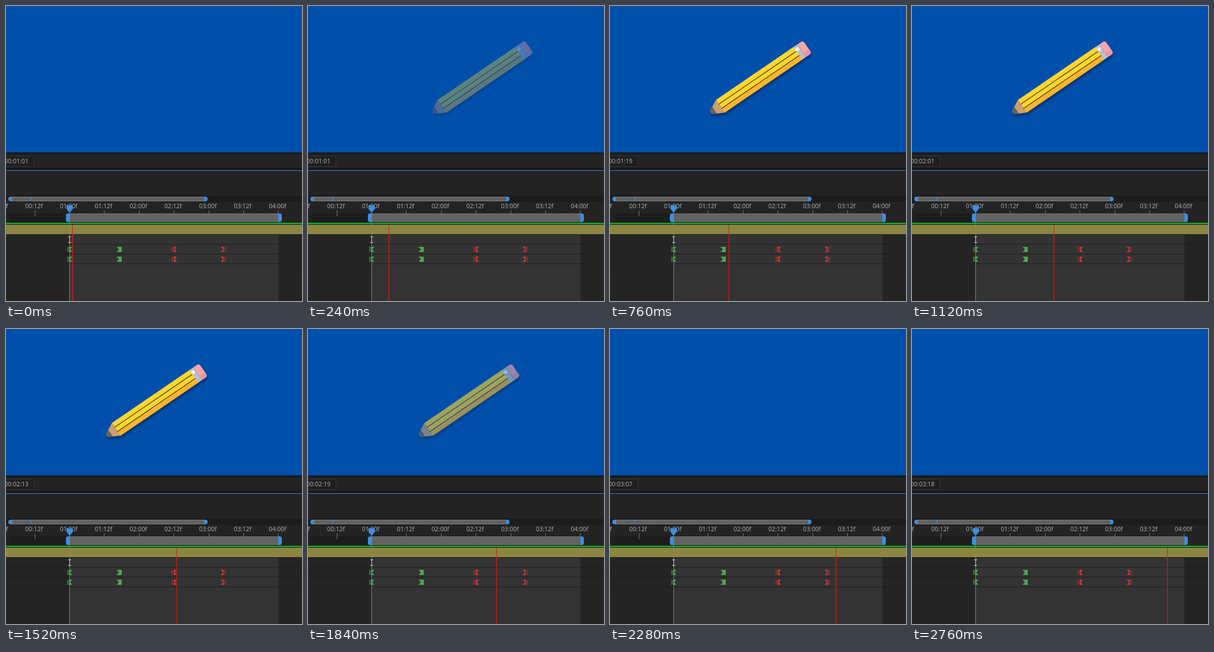
These frames come from a looping animation (514 px wide and 512 px high, 2800 ms). An HTML page:

```html
<!DOCTYPE html>
<html lang="en">
<head>
<meta charset="utf-8">
<title>Pencil timeline</title>
<style>
  html, body { margin: 0; width: 100%; height: 100%; overflow: hidden; background: #232323; }
  svg { display: block; width: 514px; height: 512px; }
  text { font: 10.5px "Noto Sans", "Open Sans", sans-serif; fill: #a9a9a9; }
  #pencil { filter: drop-shadow(1px 4px 2px rgba(0, 10, 40, .42)); }
</style>
</head>
<body>
<svg viewBox="0 0 514 512">
  <defs>
    <g id="keyOut">
      <path d="M-4.5-4.5H4.5L1 0 4.5 4.5H-4.5Z" fill="currentColor"/>
      <path d="M-4.5-4.5H0V4.5H-4.5Z" fill="#1c1c1c" opacity=".5"/>
    </g>
    <path id="keyIn" d="M-4.5-4.5H4.5V4.5H-4.5L-.5 0Z" fill="currentColor"/>
    <path id="half" d="M0-4.5H4.5V4.5H0Z" fill="#1c1c1c" opacity=".5"/>
  </defs>

  <rect width="514" height="512" fill="#232323"/>
  <rect width="514" height="254" fill="#0050ab"/>

  <g id="pencil">
    <g transform="translate(191.5 174) rotate(-34.3)">
      <path d="M0-13.3L-18-4Q-22 0-18 4L0 13.3Z" fill="#c99f6c"/>
      <path d="M-12-7.1L-18-4Q-22 0-18 4L-12 7.1Z" fill="#6b6059"/>
      <path d="M0-13.3H164V13.3H0Z" fill="#ffd530"/>
      <path d="M0 4.4H164V13.3H0Z" fill="#f9b52d"/>
      <path d="M-1-4.4H164M-1 4.4H164" stroke="#37332c" stroke-width="1.1"/>
      <path d="M163-13.3H171V13.3H163Z" fill="#b9bfd0"/>
      <path d="M163-9.5H169V-3.5H163Z" fill="#f4f6fb"/>
      <path d="M171-13.3H178Q183-13.3 183-8V8Q183 13.3 178 13.3H171Z" fill="#f9a5aa"/>
      <path d="M171 5H183V8Q183 13.3 178 13.3H171Z" fill="#e9969f"/>
    </g>
  </g>

  <!-- header -->
  <rect y="254" width="514" height="4" fill="#1b1b1b"/>
  <rect x="-2" y="260.5" width="50.5" height="18" fill="#1f1f1f" stroke="#343434"/>
  <rect y="281" width="514" height="4" fill="#191919"/>
  <rect y="285" width="514" height="1" fill="#3f7fd6"/>
  <text id="code" x="39" y="273" text-anchor="end"></text>

  <!-- navigator and ruler -->
  <rect y="329" width="514" height="11" fill="#1c1c1c"/>
  <rect x="10.5" y="331.5" width="334" height="7" fill="#606060" stroke="#7c7c7c"/>
  <path d="M10 331H8Q4 331 4 335T8 339H10ZM344 331H346Q350 331 350 335T346 339H344Z" fill="#3d8ee0"/>
  <rect x="42.5" y="331" width="2" height="8" fill="#4080bd"/>
  <rect y="360" width="104" height="15" fill="#1c1c1c"/>
  <rect y="360" width="8" height="15" fill="#202020"/>
  <g id="ruler"></g>
  <rect x="110" y="360" width="363" height="15" fill="#636363"/>
  <path d="M110 360.5H473" stroke="#747474"/>
  <path d="M110 360H108Q104 360 104 364V371Q104 375 108 375H110ZM473 360H475Q479 360 479 364V371Q479 375 475 375H473Z" fill="#3d8ee0"/>

  <!-- layers -->
  <rect y="375" width="514" height="137" fill="#242424"/>
  <rect x="110" y="397" width="363" height="115" fill="#333"/>
  <rect y="375" width="514" height="5" fill="#15321a"/>
  <rect y="376.5" width="514" height="2" fill="#25bd30"/>
  <rect y="380" width="514" height="16" fill="#8c8541"/>
  <path d="M0 380.5H514" stroke="#9b944c"/>
  <path d="M0 396.5H514M0 413.5H514M0 430.5H514M0 447.5H514" stroke="#1d1d1d"/>
  <g id="keys"></g>

  <g id="head">
    <rect id="trail" x="-1" y="396" width="2" height="116" fill="#981c1a"/>
    <rect x="-.5" y="380" width="1" height="132" fill="#b8221c"/>
  </g>
  <path d="M110.5 356V512" stroke="#4791e2"/>
  <path d="M105 346H116V352L110.5 359 105 352Z" fill="#3d8ee0"/>
  <path d="M108 400.5H113M108 410.5H113M110.5 400V411" stroke="#d8d8d8" fill="none"/>
</svg>
<script>
const $ = id => document.getElementById(id);
const LOOP = 2800, TICK = 40, ORIGIN = 110.5, STEP = 5.04;
const pad = n => String(n).padStart(2, '0');

let marks = '';
for (let i = -2; i < 7; i++) {
  const x = 110.5 + i * 60.4, f = 24 + i * 12;
  const label = pad(Math.floor(f / 24)) + ':' + pad(f % 24) + 'f';
  marks += `<text x="${x - 1.5}" y="351" text-anchor="middle">${label}</text>`;
  marks += `<path d="M${Math.floor(x) + .5} 354.5V${i < 0 ? 365 : 360}" stroke="#777"/>`;
}
$('ruler').innerHTML = marks;

$('keys').innerHTML = [422.5, 439.5].map(y => {
  const key = (id, x, color) => `<use href="#${id}" x="${x}" y="${y}" color="${color}"/>`;
  return key('keyOut', 110.5, '#4fa650') + key('keyIn', 196.5, '#4fa650') +
    key('keyOut', 292, '#cf3f3d') + key('keyIn', 377.5, '#cf3f3d') + key('half', 377.5, '');
}).join('');

// [time in ms, composition frame]; flat pairs are playback stalls
const PACE = [[0, 1], [40, 1], [80, 2], [440, 11], [480, 11], [520, 13], [760, 19], [840, 19],
  [880, 22], [1120, 27], [1200, 27], [1240, 30], [1520, 37], [1760, 41], [1840, 43],
  [2000, 49], [2280, 56], [2320, 56], [2360, 57], [2760, 66], [2800, 66]];

function frameAt(ms) {
  const t = Math.floor(ms / TICK) * TICK;
  const i = PACE.findIndex(p => p[0] > t);
  const [t0, f0] = PACE[i - 1], [t1, f1] = PACE[i];
  return Math.floor(f0 + (f1 - f0) * (t - t0) / (t1 - t0) + 1e-6);
}

const unit = v => Math.min(1, Math.max(0, v));

function draw(ms) {
  const f = frameAt(ms);
  const left = 1 - unit((f - 1) / 16);
  const out = unit((f - 37) / 16);
  const shift = 105 * left ** 2.5 + 96 * out ** 1.7;
  const alpha = (1 - left ** 1.25) * (1 - out);
  $('pencil').setAttribute('transform', `translate(${shift.toFixed(2)} 0)`);
  $('pencil').setAttribute('opacity', alpha.toFixed(3));

  $('head').setAttribute('transform', `translate(${Math.round(ORIGIN + f * STEP - .5) + .5} 0)`);
  $('trail').setAttribute('width', f < 2 ? 3 : 2);

  const shown = f >= 66 ? 66 : f - (f - 1) % 6;
  $('code').textContent = `00:${pad(1 + Math.floor(shown / 24))}:${pad(shown % 24)}`;
}

const start = performance.now();
function loop() {
  draw((performance.now() - start) % LOOP);
  requestAnimationFrame(loop);
}
loop();
</script>
</body>
</html>
```
